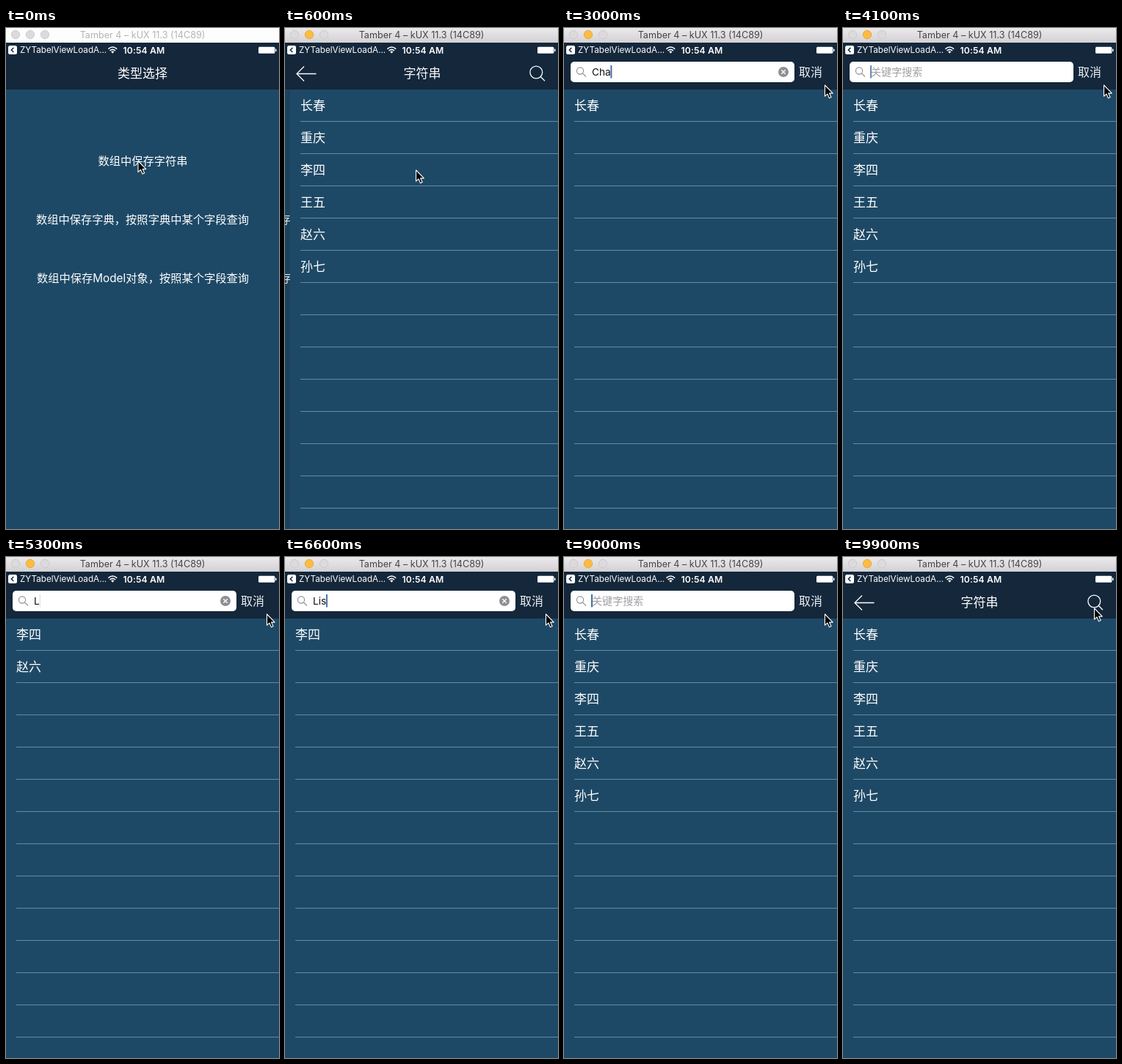
An HTML page for the animation above (10000 ms loop, 372x684 px).

```html
<!DOCTYPE html>
<html lang="zh-CN">
<head>
<meta charset="utf-8">
<title>列表搜索</title>
<style>
  html, body { margin: 0; width: 100%; height: 100%; overflow: hidden; background: #1e4966; }
  svg { display: block; width: 372px; height: 684px; }
  text { font-family: Inter, "Noto Sans CJK SC", "Noto Sans CJK", sans-serif; fill: #fff; white-space: pre; }
  .mid { text-anchor: middle; }
  .menu { font-size: 15.27px; }
  .row { font-size: 17px; }
  .head { font-size: 17px; font-weight: 500; }
  .line { fill: none; stroke: #fff; stroke-width: 1.3; }
</style>
</head>
<body>
<svg viewBox="0 0 372 684">
  <defs>
    <linearGradient id="chrome" x2="0" y2="1">
      <stop stop-color="#ebe9eb"/><stop offset="1" stop-color="#d3d1d3"/>
    </linearGradient>
  </defs>
  <rect width="372" height="684" fill="#1e4966"/>

  <g id="menu">
    <text class="menu mid" x="186.5" y="186.7">数组中保存字符串</text>
    <text class="menu mid" x="186" y="266.7">数组中保存字典，按照字典中某个字段查询</text>
    <text class="menu mid" x="186.5" y="346.7">数组中保存Model对象，按照某个字段查询</text>
  </g>
  <rect id="shade" y="84" width="372" height="600" fill="#000"/>
  <g id="list">
    <rect y="84" width="372" height="600" fill="#1e4966"/>
  </g>

  <rect y="20" width="372" height="64" fill="#14273b"/>
  <text id="menuHead" class="head mid" x="186" y="68">类型选择</text>
  <g id="nav">
    <text id="listHead" class="head mid" x="186" y="68">字符串</text>
    <path class="line" d="M42.5 62.5H16M26 52.5L16 62.5L26 72.5"/>
    <circle class="line" cx="342.3" cy="60.5" r="8.4"/>
    <path class="line" d="M348.3 66.5L354 72.3"/>
  </g>

  <g id="search">
    <rect x="9" y="46" width="305" height="28" rx="5" fill="#fff"/>
    <g fill="none" stroke="#8e8e93" stroke-width="1.1">
      <circle cx="22" cy="58.5" r="4.6"/><path d="M25.3 61.8L30 66.5"/>
    </g>
    <text id="hint" x="38" y="65" style="font-size:14.1px;fill:#a0a0a4">关键字搜索</text>
    <text id="query" x="38" y="64.8" style="font-size:13.7px;fill:#111"></text>
    <rect id="caret" y="51" width="2" height="17.5" fill="#45709f"/>
    <g id="clear">
      <circle cx="299" cy="60" r="7" fill="#8e8e93"/>
      <path d="M296.3 57.3L301.7 62.7M301.7 57.3L296.3 62.7" stroke="#fff" stroke-width="1.4"/>
    </g>
    <text x="320" y="65.5" style="font-size:16px;fill:#edf1f4">取消</text>
  </g>

  <rect x="3" y="24" width="12" height="12" rx="2.5" fill="#fff"/>
  <path d="M10.3 27L7.3 30L10.3 33" fill="none" stroke="#14273b" stroke-width="1.5"/>
  <text x="19" y="34.3" style="font-size:11.7px">ZYTabelViewLoadA...</text>
  <g fill="none" stroke="#fff" stroke-width="1.6">
    <path d="M139.4 28.6Q145.3 23.4 151.2 28.6M141.5 31Q145.3 27.7 149.1 31"/>
  </g>
  <path d="M143.1 32.3Q145.3 30.6 147.5 32.3L145.3 34.8Z" fill="#fff"/>
  <text class="mid" x="188" y="34.5" style="font-size:12.2px;font-weight:600;letter-spacing:.15px">10:54 AM</text>
  <rect x="344" y="25.8" width="22.4" height="9" rx="1.5" fill="#fff"/>
  <rect x="367" y="28.5" width="1.5" height="3.6" rx=".7" fill="#fff"/>

  <rect id="bar" width="372" height="20"/>
  <g id="lights" stroke-width=".8"></g>
  <text id="title" class="mid" x="186" y="14" style="font-size:12.6px">Tamber 4 – kUX 11.3 (14C89)</text>

  <path id="pointer" d="M0 0V15.2L3.5 12L6 17.7L8.6 16.6L6.1 11.1H10.8Z" fill="#000" stroke="#fff" stroke-width="1.1" stroke-linejoin="round"/>
</svg>
<script>
const LOOP = 10000, STEP = 100;
const $ = id => document.getElementById(id);
const svg = (tag, attrs, parent) => {
  const el = document.createElementNS('http://www.w3.org/2000/svg', tag);
  set(el, attrs);
  return parent.appendChild(el);
};
function set(el, attrs) {
  for (const k in attrs) el.setAttribute(k, attrs[k]);
}

const names = [
  ['长春', 'changchun'], ['重庆', 'chongqing'], ['李四', 'lisi'],
  ['王五', 'wangwu'], ['赵六', 'zhaoliu'], ['孙七', 'sunqi']
];

// [time, field text]; every entry also makes the caret solid again
const edits = [
  [0, ''], [1400, ''], [1600, ''], [1800, ''],
  [2300, 'C'], [2500, 'Ch'], [2800, 'Cha'], [2900, 'Cha'], [3100, 'Cha'],
  [3300, 'Ch'], [3500, 'C'], [3700, ''], [3900, ''],
  [4900, 'L'], [5900, 'Li'], [6200, 'Li'], [6400, 'Li'],
  [6600, 'Lis'], [6700, 'Lisi'], [6800, 'Lisi'],
  [7000, 'Lis'], [7100, 'Li'], [7300, 'L'], [7500, ''], [7600, ''],
  [8600, 'W'], [8800, 'W'], [9000, ''], [9200, '']
];
const blink = [1, 1, .8, .5, .15, 0, 0, .4, 1, 1];

// [time, x, y]
const path = [
  [0, 180, 181.5], [300, 180, 181.5], [400, 178.5, 194], [700, 178.5, 194],
  [1000, 262, 132], [1300, 342, 62], [1400, 342, 62], [1600, 355.5, 78],
  [9400, 355.5, 78], [9600, 338, 63], [9700, 338, 63], [9900, 342.5, 70]
];
const push = [[0, 372], [300, 372], [400, 178], [500, 44], [600, 7], [700, 1], [800, 0]];
const field = [[0, 0], [1300, 0], [1500, 1], [9600, 1], [9800, 0]];

function tween(track, t, col = 1) {
  const i = track.findIndex(k => k[0] > t);
  if (i < 0) return track[track.length - 1][col];
  const a = track[i - 1], b = track[i];
  return a[col] + (b[col] - a[col]) * (t - a[0]) / (b[0] - a[0]);
}

const rows = names.map((n, i) =>
  svg('text', { class: 'row', x: 14, y: 112.4 + 44 * i }, $('list')));
for (let y = 127; y < 684; y += 44)
  svg('rect', { x: 14, y, width: 358, height: 1, fill: '#638ca3' }, $('list'));
const lights = [13, 33, 53].map(cx =>
  svg('circle', { cx, cy: 9, r: 5.7 }, $('lights')));

function drawWindow(active) {
  set($('bar'), { fill: active ? 'url(#chrome)' : '#fdfdfd' });
  $('title').style.fill = active ? '#464446' : '#b4b4b4';
  lights.forEach((el, i) => {
    const amber = active && i === 1;
    set(el, { fill: amber ? '#fdbc40' : '#dcdadc', stroke: amber ? '#e0a135' : '#c8c6c8' });
  });
}

function drawPages(t) {
  const x = tween(push, t), done = 1 - x / 372;
  set($('menu'), { transform: `translate(${-112 * done} 0)` });
  set($('shade'), { opacity: .1 * done });
  set($('list'), { transform: `translate(${x} 0)` });
  set($('menuHead'), { x: 186 - 120 * done, opacity: Math.max(0, 1 - done * 1.5) });
  set($('listHead'), { x: 186 + x * .15 });
  const open = tween(field, t);
  set($('nav'), { opacity: done * (1 - open) });
  set($('search'), { opacity: open });
}

function drawSearch(t) {
  const [since, text] = edits.filter(e => e[0] <= t).pop();
  const found = names.filter(n => n[1].includes(text.toLowerCase()));
  rows.forEach((el, i) => { el.textContent = found[i] ? found[i][0] : ''; });
  $('query').textContent = text;
  set($('hint'), { opacity: text ? 0 : 1 });
  set($('clear'), { opacity: text ? 1 : 0 });
  const end = text ? 37.6 + $('query').getComputedTextLength() : 37;
  set($('caret'), { x: end, opacity: blink[Math.floor((t - since) / STEP) % blink.length] });
}

function draw(t) {
  drawWindow(t >= 300);
  drawPages(t);
  drawSearch(t);
  set($('pointer'), { transform: `translate(${tween(path, t)} ${tween(path, t, 2)})` });
}

const start = performance.now();
function tick() {
  const t = (performance.now() - start) % LOOP;
  draw(Math.floor(t / STEP) * STEP);
  requestAnimationFrame(tick);
}
tick();
</script>
</body>
</html>
```
